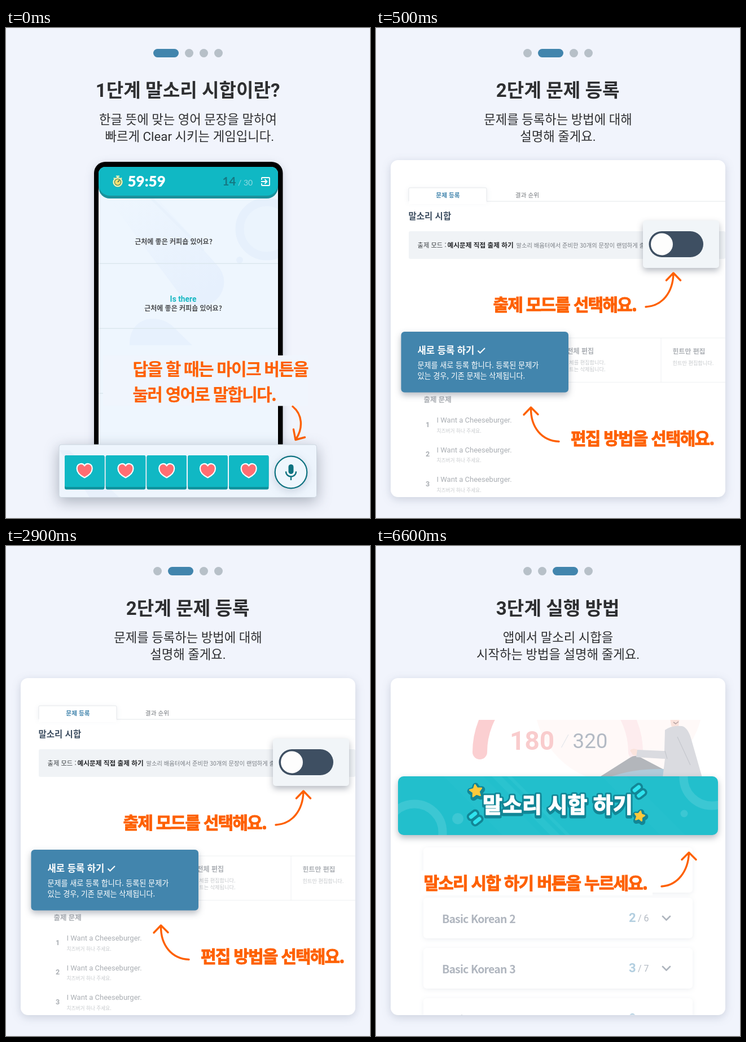
An HTML page that plays this animation: 645x868 px, repeating every 8 s.

```html
<!DOCTYPE html>
<html lang="ko">
<head>
<meta charset="utf-8">
<title>게임 안내</title>
<style>
html, body { margin: 0; width: 100%; height: 100%; overflow: hidden; background: #f1f4fc; }
svg { display: block; width: 100vw; height: 100vh; }
text { font-family: "Noto Sans CJK KR", "Noto Sans CJK", sans-serif; }
.r { font-family: Roboto, "Noto Sans CJK KR", "Noto Sans CJK", sans-serif; }
.l { font-family: Lato, sans-serif; }
.card { filter: drop-shadow(0 4px 8px rgba(40, 60, 90, .19)); }
.lift { filter: drop-shadow(0 5px 6px rgba(30, 45, 65, .32)); }
.float { filter: drop-shadow(0 7px 13px rgba(30, 45, 65, .34)); }
.soft { filter: drop-shadow(0 2px 4px rgba(60, 80, 110, .09)); }
</style>
</head>
<body>
<svg id="stage" viewBox="0 0 645 868" xmlns="http://www.w3.org/2000/svg"></svg>
<script>
const TEAL = '#10b8c4', BLUE = '#4285ad', ORANGE = '#fe6000', INK = '#2e2f31';
const stage = document.getElementById('stage');

const rect = (x, y, w, h, fill, r = 0, more = '') =>
  `<rect x="${x}" y="${y}" width="${w}" height="${h}" rx="${r}" fill="${fill}" ${more}/>`;
const circle = (x, y, r, fill, more = '') =>
  `<circle cx="${x}" cy="${y}" r="${r}" fill="${fill}" ${more}/>`;
const line = (d, color, w = 1, more = '') =>
  `<path d="${d}" fill="none" stroke="${color}" stroke-width="${w}" ${more}/>`;
const shape = (d, fill, more = '') => `<path d="${d}" fill="${fill}" ${more}/>`;
const text = (x, y, size, fill, str, weight = 400, more = '') =>
  `<text x="${x}" y="${y}" font-size="${size}" fill="${fill}" font-weight="${weight}" ${more}>${str}</text>`;
const group = (more, ...parts) => `<g ${more}>${parts.join('')}</g>`;
const times = (n, fn) => Array.from({ length: n }, (_, i) => fn(i)).join('');

const ROUND = 'stroke-linecap="round" stroke-linejoin="round"';
const MID = 'text-anchor="middle"';
const arrow = d => line(d, ORANGE, 3.4, ROUND);
const callout = (x, y, str, outline = .9) =>
  text(x, y, 30, ORANGE, str, 700, `letter-spacing="-1.8" stroke="${ORANGE}" stroke-width="${outline}"`);

function pager(active) {
  let x = 261;
  return times(4, i => {
    const w = i === active ? 45 : 15;
    const dot = rect(x, 37, w, 15, i === active ? BLUE : '#b7c0c8', 7.5);
    x += w + 11;
    return dot;
  });
}

function heading(step, title, first, second, shift = 0) {
  return pager(step - 1) +
    text(322.2, 122, 33.2, INK, `${step}단계 ${title}`, 700, `class="r" ${MID}`) +
    text(322.5, 170, 22.3, INK, first, 400, `class="r" ${MID}`) +
    text(322.5 + shift, 200, 22.3, INK, second, 400, `class="r" ${MID}`);
}

const whiteCard = rect(26, 234, 593, 597, '#fff', 13, 'class="card"');

function star(cx, cy, r, turn) {
  let d = '';
  for (let i = 0; i < 10; i++) {
    const a = turn + i * Math.PI / 5, k = i % 2 ? r * .5 : r;
    d += `${i ? 'L' : 'M'}${(cx + k * Math.sin(a)).toFixed(1)} ${(cy - k * Math.cos(a)).toFixed(1)}`;
  }
  d += 'Z';
  return line(d, '#128696', 11, ROUND + ' transform="translate(1 2)"') +
    shape(d, '#ffc93c', `stroke="#ffc93c" stroke-width="2.5" ${ROUND}`);
}

function bars(x, y, turn) {
  const pair = (fill, grow) => times(2, i =>
    rect(-8 - grow, -10 + i * 12 - grow, 16 + grow * 2, 7 + grow * 2, fill, 3 + grow));
  return group(`transform="translate(${x} ${y}) rotate(${turn})"`, pair('#128696', 4), pair('#2fe3ee', 0));
}

function heartButton(i) {
  const x = 104 + i * 72.75;
  return rect(x, 757, 70.5, 60.5, '#0d929d', 3) + rect(x, 757, 70.5, 56, TEAL, 3) +
    shape('M0 12.5C-5 10-13.5 4.5-13.5-3.5C-13.5-13-3.5-14.5 0-8.5C3.5-14.5 13.5-13 13.5-3.5C13.5 4.5 5 10 0 12.5Z',
      '#ff6d72', `stroke="#fff" stroke-width="2.2" ${ROUND} transform="translate(${x + 35.2} 784)"`);
}

function gameScene() {
  const question = '근처에 좋은 커피숍 있어요?';
  const screen = group('clip-path="url(#screen)"',
    rect(164, 246, 318, 500, '#eef6fe'),
    shape('M172 290L258 290L374 420A42 42 0 0 1 314 480Z', 'url(#band)'),
    line('M254 298L350 394', '#e6f0fc', 5, 'opacity=".6"'),
    circle(462, 356, 48, '#ebf4fd', 'stroke="#e6f0fc" stroke-width="15"'),
    circle(414, 411, 6, '#e6f0fc'),
    shape('M219 562C218 532 236 515 260 515C274 515 284 519 294 527L330 562Z', '#e7f1fd'),
    times(3, i => rect(164, 416.5 + i * 115, 318, 1.5, '#dbe7ee')),
    rect(164, 240, 318, 62, '#1b919b', 20),
    rect(164, 230, 318, 67, TEAL, 20));
  const watch = circle(198, 273, 7.6, '#f7e98b', 'stroke="#fbf3b4" stroke-width="2"') +
    circle(198, 273, 5.6, '#f5e06f', 'stroke="#4b8c68" stroke-width="1.3"') +
    line('M195 262.5H201M198 263V266M191 265.5L193 267.5M205 265.5L203 267.5', '#fbf3b4', 2) +
    line('M198 273L201 269.5', '#32685b', 1.6);
  const exit = line('M453 269V266Q453 265 454 265H466Q467 265 467 266V278Q467 279 466 279H454Q453 279 453 278V275M452 272H462M458.5 268L462.5 272L458.5 276', '#fff', 1.8);
  const mic = circle(505, 787, 28.3, '#eef6fd', 'stroke="#0e7280" stroke-width="2.2" class="card"') +
    rect(500.5, 773, 9, 17, '#0e7280', 4.5) +
    line('M496 785.5C496 797.5 514 797.5 514 785.5M505 795V801', '#0e7280', 2.4);
  return heading(1, '말소리 시합이란?', '한글 뜻에 맞는 영어 문장을 말하여', '빠르게 Clear 시키는 게임입니다.', 2.8) +
    rect(156, 237, 334.5, 520, '#000', 20, 'class="card"') + screen + watch +
    text(215.5, 281, 26, '#fff', '59:59', 900, 'class="l"') +
    text(383.5, 279, 20.5, '#157883', '14', 700, 'class="l"') +
    text(411, 279, 14, '#93dbe1', '/ 30', 400, 'class="l"') + exit +
    text(297, 382.7, 12, '#4b4d50', question, 700, MID) +
    text(314, 485, 13.8, '#17b7c3', 'Is there', 700, `class="r" ${MID}`) +
    text(314, 500.5, 12, '#4b4d50', question, 700, MID) +
    rect(172, 580, 364, 89.5, '#f0f5fd') +
    callout(224.5, 615, '답을 할 때는 마이크 버튼을', .2) +
    callout(224.5, 660, '눌러 영어로 말합니다.', .2) +
    arrow('M508 670.5C525 684 527 708 514 728M509.5 711L513 729.5L529.5 725') +
    rect(94, 738, 456.5, 93.5, '#eef5fd', 4, 'class="float" stroke="#cbd5de"') +
    shape('M95 748L112 748L200 831H148Z', '#e8f0fb') +
    times(5, heartButton) + mic;
}

function editScene() {
  const pale = '#abafb4', faint = '#c6c9cc';
  const row = i => {
    const y = i * 52.5;
    return text(91.5, 706.5 + y, 12.5, pale, i + 1, 700, `class="r" ${MID}`) +
      text(107.5, 699 + y, 13, pale, 'I Want a Cheeseburger.', 400, 'class="r"') +
      text(107.5, 716.5 + y, 8.7, faint, '치즈버거 하나 주세요.');
  };
  return heading(2, '문제 등록', '문제를 등록하는 방법에 대해', '설명해 줄게요.') + whiteCard +
    line('M196 307H619', '#e4e7ea') +
    shape('M58 307V285Q58 283 60 283H194Q196 283 196 285V307', '#fff', 'stroke="#e4e7ea" class="soft"') +
    rect(58.5, 306, 137, 6, '#fff') +
    text(127.5, 299.5, 10.7, BLUE, '문제 등록', 700, MID) +
    text(268, 299.5, 10.7, '#75797e', '결과 순위', 400, MID) +
    text(57.5, 339, 15.5, '#3d4e61', '말소리 시합', 700) +
    rect(58, 360, 561, 49, '#f0f3f6', 3) +
    text(73.5, 389.3, 11.3, '#3c4044', '출제 모드 :', 400) +
    text(126.5, 389.3, 11.7, '#26282b', '예시문제 직접 출제 하기', 700) +
    text(248.5, 389, 10.3, '#787d83', '말소리 배움터에서 준비한 30개의 문장이 랜덤하게 출제') +
    rect(473, 341, 135, 84, '#f1f5f8', 5, 'class="lift"') +
    rect(483.5, 360, 96.5, 46, '#3e4f62', 23) + circle(506.5, 383, 19.5, '#fdfdfd') +
    callout(207.5, 501, '출제 모드를 선택해요.') +
    arrow('M478 494C508 492 526 468 527 435M514.5 447L527 434L539.5 447') +
    line('M330 549H619M330 627.5H619M505 549V627.5', '#eef0f2') +
    text(386, 577, 12, pale, '전체 편집', 700, 'text-anchor="end"') +
    text(406.5, 595.5, 9.2, faint, '전체를 편집합니다.', 400, 'text-anchor="end"') +
    text(406.5, 608, 9.2, faint, '힌트는 삭제됩니다.', 400, 'text-anchor="end"') +
    text(525.5, 577, 11.9, pale, '힌트만 편집', 700) +
    text(525.5, 597, 9.2, faint, '힌트만 편집합니다.') +
    text(84.5, 663, 12.4, pale, '출제 문제', 700) + times(3, row) +
    rect(44.5, 538, 296.5, 107.5, BLUE, 6, 'class="lift"') +
    text(73.5, 577, 16.6, '#fff', '새로 등록 하기', 700) +
    line('M180.5 571.5L184.5 575.5L193 567', '#fff', 2) +
    text(73.5, 602, 13.1, '#fff', '문제를 새로 등록 합니다. 등록된 문제가') +
    text(73.5, 620.5, 13.1, '#fff', '있는 경우, 기존 문제는 삭제됩니다.') +
    callout(345, 737.5, '편집 방법을 선택해요.') +
    arrow('M324 732.5C294 731 274 708 274.5 673M262 685L274.5 672L287 684.5');
}

function playScene() {
  const level = (i, score, total) => {
    const y = i * 89;
    return rect(84, 623 + y, 477, 72, '#fff', 6, 'class="soft"') +
      text(117, 667.5 + y, 19.5, '#b0b6bf', 'Basic Korean ' + (i + 2), 700, 'letter-spacing="-.85"') +
      text(448, 666 + y, 22, '#b3cfe0', score, 700, 'class="r"') +
      text(464, 665 + y, 16, '#b4bbc4', '/ ' + total, 400, 'class="r"') +
      line(`M508 ${656 + y}L514.5 ${662.5 + y}L521 ${656 + y}`, '#aeb5be', 2.6, ROUND);
  };
  const gauge = circle(430, 270, 150, '#fff9f8') +
    line('M460 365A138 138 0 0 0 322 227', '#fdecee', 26, ROUND) +
    line('M184 365A138 138 0 0 1 322 227', '#fbcfd1', 26, ROUND) +
    text(237, 361, 46, '#f9cccd', '180', 700, 'class="r"') +
    line('M328.5 357L341 334', '#e4e7eb', 1.3) +
    text(348.5, 358, 36.8, '#b3bac4', '320', 400, 'class="r"');
  const person = shape('M398 408L450 375Q459 369 468 374L512 397L500 410Z', '#b3b6bb') +
    shape('M412 410Q455 394 510 395L556 410Z', '#b0cad9') +
    shape('M521 304H538L536 320Q529 326 523 318Z', '#fae3dc') +
    line('M527 312L531 315L536 311', '#b9a6a6', 1.6) +
    shape('M450 362Q455 357 464 361L465 372L455 370Z', '#fae3dc') +
    shape('M512 326Q524 317 542 319Q552 321 558 340L578 410H508L512 377L461 374L463 361L511 363Z', '#dadbe0') +
    line('M534 338L557 388M512 363L516 377', '#c5c7cd', 1.2);
  const banner = rect(39, 408, 567, 104, '#22bfcc', 10, 'class="lift"') +
    group('clip-path="url(#banner)"',
      shape('M120 408H190L294 512H224Z', '#25c0cd') +
      shape('M205 408H222L326 512H309ZM232 408H240L344 512H336Z', '#2ac3cf') +
      shape('M400 408H444L548 512H504Z', '#25c0cd'),
      circle(68, 507, 50, 'none', 'stroke="#3cc7d3" stroke-width="15"'),
      circle(595, 410, 50, 'none', 'stroke="#3cc7d3" stroke-width="15"'),
      circle(145, 483, 10, '#3cc7d3'), circle(546, 474, 6.5, '#3cc7d3'));
  const label = (y, fill, edge, w) =>
    text(322, y, 38, fill, '말소리 시합 하기', 900, `${MID} stroke="${edge}" stroke-width="${w}" ${ROUND}`);
  return heading(3, '실행 방법', '앱에서 말소리 시합을', '시작하는 방법을 설명해 줄게요.') + whiteCard +
    group('clip-path="url(#body)"', gauge, person,
      rect(84, 534, 477, 80, '#fff', 6, 'class="soft"'),
      rect(80, 575, 410, 44, '#fff'),
      level(0, 2, 6), level(1, 3, 7), level(2, 0, 8)) +
    banner + star(177, 434, 11, -.15) + star(467, 478.5, 9, .2) +
    bars(466, 435, -38) + bars(176, 482, -38) +
    label(475, '#128696', '#128696', 7) + label(472, '#128696', '#128696', 7) +
    label(472, '#fff', '#fff', 1.4) +
    callout(84.5, 608, '말소리 시합 하기 버튼을 누르세요.') +
    arrow('M506 603C534 601 553 577 554.5 544M542 555.5L554.5 543L567 555.5');
}

stage.innerHTML = `<defs>
  <linearGradient id="band" x1="0" y1="0" x2=".7" y2="1">
    <stop offset=".1" stop-color="#eef6fe"/><stop offset="1" stop-color="#e6f0fd"/>
  </linearGradient>
  <clipPath id="screen">${rect(164, 246, 318, 510, '#000', 12)}</clipPath>
  <clipPath id="banner">${rect(39, 408, 567, 104, '#000', 10)}</clipPath>
  <clipPath id="body">${rect(38, 308, 570, 522.5, '#000')}</clipPath>
</defs>` + rect(0, 0, 645, 868, '#f1f4fc') +
  [gameScene, editScene, playScene].map(s => group('class="scene"', s())).join('');

const scenes = stage.querySelectorAll('.scene');
const LOOP = 8000, CUTS = [500, 4500];

function update(ms) {
  const t = ms % LOOP;
  const current = CUTS.filter(c => t >= c).length;
  scenes.forEach((s, i) => s.setAttribute('display', i === current ? 'inline' : 'none'));
}

const start = performance.now();
function tick() {
  update(performance.now() - start);
  requestAnimationFrame(tick);
}
tick();
</script>
</body>
</html>
```
